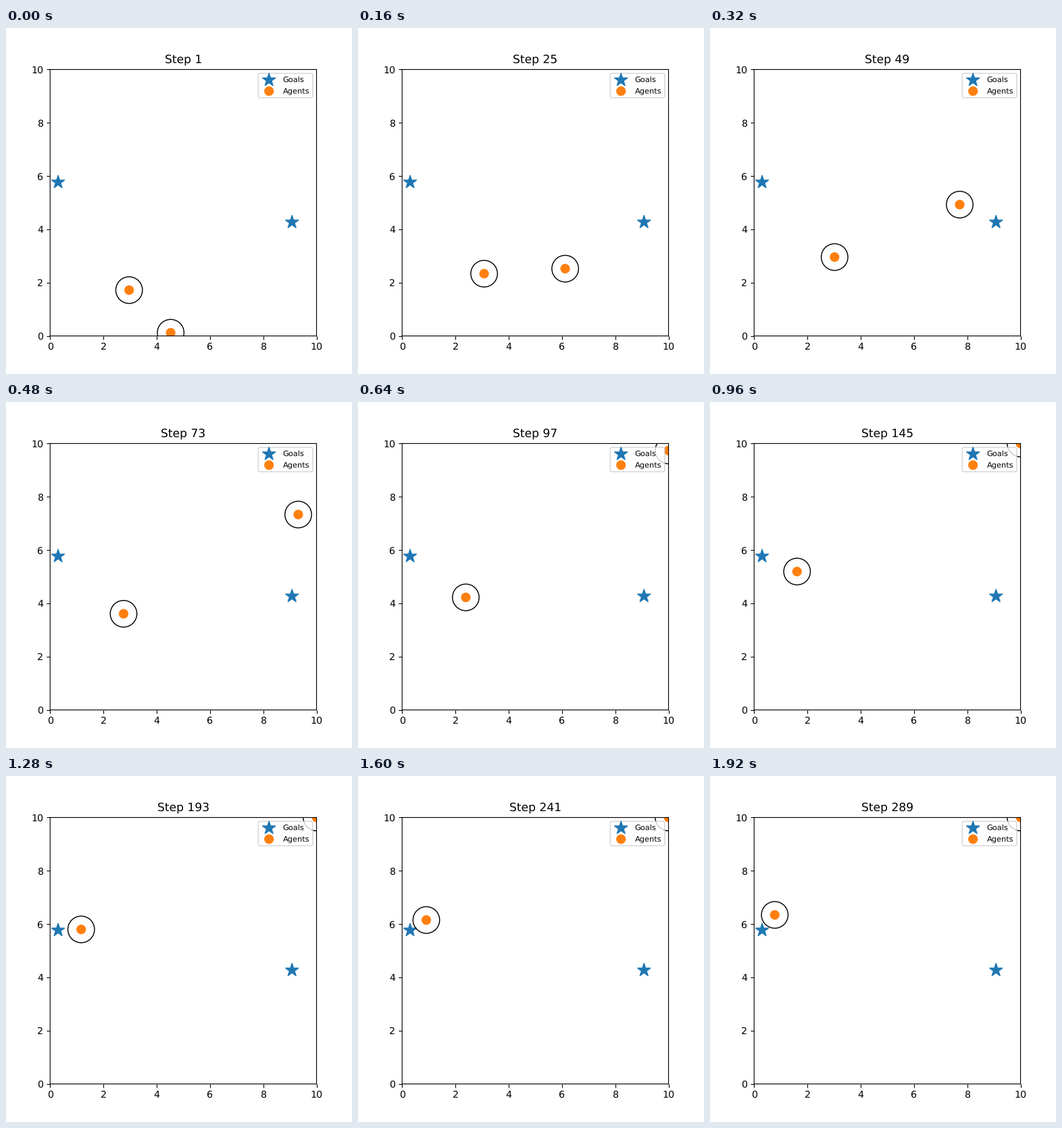
These frames come from a looping animation (512 by 512 pixels, 2 s). A matplotlib script:

```python
import numpy as np
import matplotlib.pyplot as plt
from matplotlib.animation import FuncAnimation

FRAMES, STRIDE, INTERVAL = 25, 12, 80
SIZE = 10
GOALS = np.array([[0.30, 5.77], [9.08, 4.27]])

# Waypoints of the slow agent, one every 48 steps
WAYPOINTS = np.array([
    [2.965, 1.72], [3.02, 2.96], [2.39, 4.225], [1.612, 5.195],
    [1.166, 5.80], [0.908, 6.153], [0.775, 6.345],
])
SLOPES = np.gradient(WAYPOINTS, axis=0, edge_order=2)

# The fast agent runs straight until the walls stop it
START = np.array([4.525, 0.12])
VELOCITY = np.array([0.0665, 0.1002])


def slow_agent(step):
    """Cubic Hermite curve through the waypoints."""
    u = (step - 1) / 48
    i = min(int(u), len(WAYPOINTS) - 2)
    t = u - i
    a, b = WAYPOINTS[i], WAYPOINTS[i + 1]
    ease = t * t * (3 - 2 * t)
    return (a + (b - a) * ease
            + SLOPES[i] * t * (1 - t) ** 2
            - SLOPES[i + 1] * t * t * (1 - t))


def fast_agent(step):
    return np.clip(START + VELOCITY * (step - 1), 0, SIZE)


# Soft, unsnapped lines and unhinted text
plt.rcParams.update({"path.snap": False, "text.hinting": "none"})

fig, ax = plt.subplots(figsize=(5, 5), dpi=102.4)
ax.set(xlim=(0, SIZE), ylim=(0, SIZE), aspect="equal")

# One colour per point keeps markers at subpixel positions
ax.scatter(*GOALS.T, s=200, marker="*", color=["C0"] * 2, label="Goals")
agents = ax.scatter([0, 0], [0, 0], s=80, color=["C1"] * 2, label="Agents")
rings = [ax.add_patch(plt.Circle((0, 0), 0.5, fill=False)) for _ in range(2)]
title = ax.set_title("")
ax.legend(loc="upper right", fontsize=8)


def update(frame):
    step = 1 + STRIDE * frame
    spots = np.array([slow_agent(step), fast_agent(step)])
    agents.set_offsets(spots)
    for ring, spot in zip(rings, spots):
        ring.center = spot
    title.set_text(f"Step {step}")
    return [agents, *rings, title]


anim = FuncAnimation(fig, update, frames=FRAMES, interval=INTERVAL,
                     init_func=lambda: update(0), repeat=True, repeat_delay=0)
plt.show()
```
